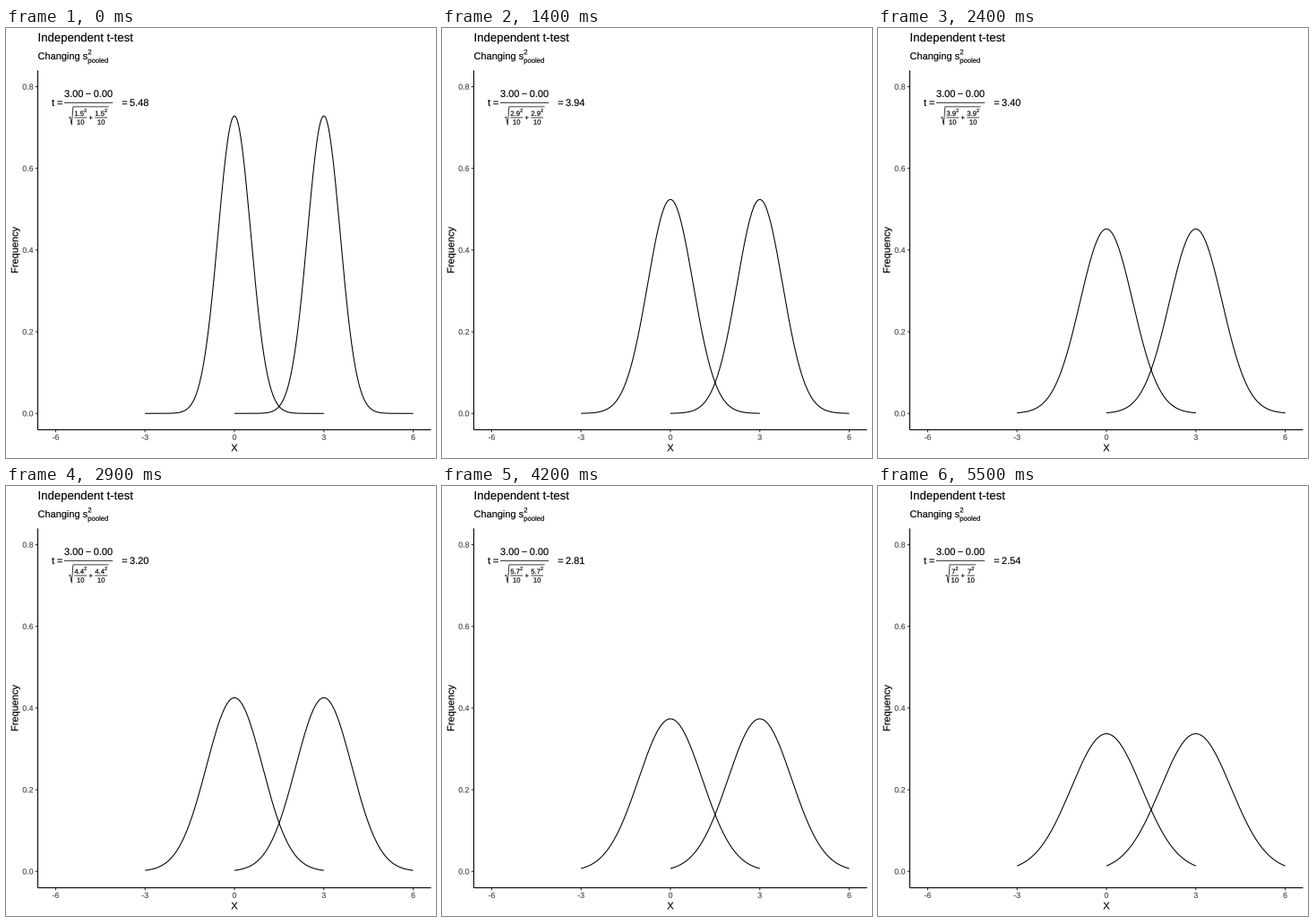
Write a matplotlib script that moves like this. It is 480 px wide and 480 px high and loops after 5.6 s.

```python
import numpy as np
import matplotlib.pyplot as plt
from matplotlib.animation import FuncAnimation
from matplotlib.patches import PathPatch
from matplotlib.path import Path
from matplotlib.textpath import TextPath
from matplotlib.transforms import Affine2D

SIZE, DPI = 480, 100
PX = 72 / DPI                      # one pixel in points
FRAMES, STEP = 56, 100
LEFT, RIGHT, TOP, BOTTOM = 35.5, 474.5, 47.3, 448.5
BODY, SMALL, TINY = 11, 7.7, 5.5   # text, script and nested script sizes
N = 10
MEANS = (0, 3)


def px_x(x):
    return LEFT + (x + 6.6) / 13.2 * (RIGHT - LEFT)


def px_y(y):
    return BOTTOM - (y + 0.04) / 0.88 * (BOTTOM - TOP)


def outline(s, size):
    return TextPath((0, 0), s, size=size, prop={"family": "Liberation Sans"})


def advance(s, size):
    return (outline(s + "|", size).get_extents().x1
            - outline("|", size).get_extents().x1)


def glyphs(s, x, y, size=BODY, align=0, turn=0):
    """Text outline with its baseline at y; align 0 left, 0.5 centre, 1 right."""
    move = Affine2D().translate(-align * advance(s, size), 0)
    move.scale(1, -1).rotate_deg(-turn).translate(x, y)
    return move.transform_path(outline(s, size))


def merge(paths):
    return Path.make_compound_path(*paths)


fig = plt.figure(figsize=(SIZE / DPI, SIZE / DPI), dpi=DPI, facecolor="white")
ax = fig.add_axes([0, 0, 1, 1])
ax.set_xlim(0, SIZE)
ax.set_ylim(SIZE, 0)
ax.axis("off")


def add_text(paths, color="black"):
    patch = PathPatch(merge(paths), fc=color, ec=color, lw=0.12, snap=False)
    return ax.add_patch(patch)


def add_line(xs, ys, width=1.07, color="black", **kw):
    return ax.plot(xs, ys, color=color, lw=width * PX, snap=False,
                   solid_capstyle="butt", **kw)[0]


# Axes
x_ticks = (-6, -3, 0, 3, 6)
y_ticks = (0, 0.2, 0.4, 0.6, 0.8)
for v in x_ticks:
    add_line([px_x(v)] * 2, [BOTTOM, BOTTOM + 2.75], color="#333333")
for v in y_ticks:
    add_line([LEFT - 2.75, LEFT], [px_y(v)] * 2, color="#333333")
add_line([LEFT, LEFT], [TOP, BOTTOM])
add_line([LEFT, RIGHT], [BOTTOM, BOTTOM])

add_text([glyphs(str(v), px_x(v), 459.8, 8.8, 0.5) for v in x_ticks]
         + [glyphs(f"{v:.1f}", 30.5, px_y(v) + 3.1, 8.8, 1) for v in y_ticks],
         "#4d4d4d")

# Titles
add_text([
    glyphs("Independent t-test", LEFT, 15, 13.2),
    glyphs("Changing s", LEFT, 35),
    glyphs("2", 91.3, 29.4, SMALL),
    glyphs("pooled", 91.2, 38.8, SMALL),
    glyphs("X", px_x(0), 472.3, BODY, 0.5),
    glyphs("Frequency", 13.4, (TOP + BOTTOM) / 2, BODY, 0.5, 90),
])

# Fixed part of the formula
add_text([
    glyphs("t", 51.1, 87),
    glyphs("=", 56.9, 87),
    glyphs("3.00", 65, 77),
    glyphs("\u2212", 88.8, 77),
    glyphs("0.00", 97.7, 77),
    glyphs("=", 129.2, 87),
    glyphs("+", 94.7, 102.6, SMALL, 0.5),
])
add_line([65, 119.2], [83.4, 83.4], 0.75)

value = add_text([glyphs("0", 0, 0)])
radical = add_line([], [], 0.75, solid_joinstyle="miter")
bars = [add_line([], [], 0.75) for _ in MEANS]
curves = [add_line([], []) for _ in MEANS]

offset = np.linspace(-3, 3, 201)


def draw(i):
    spread = (15 + i) / 10
    se = np.sqrt(2 * spread / N)
    base = f"{spread:g}"
    base_w = advance(base, SMALL)
    width = max(base_w + advance("2", TINY), advance(str(N), SMALL))

    parts = [glyphs(f"{3 / se:.2f}", 138, 87)]
    reach = 4.6 + width / 2
    for side, bar in zip((-1, 1), bars):
        mid = 94.7 + side * reach
        start = mid - (base_w + advance("2", TINY)) / 2
        parts += [glyphs(base, start, 98, SMALL),
                  glyphs("2", start + base_w, 94, TINY),
                  glyphs(str(N), mid, 107.6, SMALL, 0.5)]
        bar.set_data([mid - width / 2, mid + width / 2], [100, 100])
    value.set_path(merge(parts))

    edge = 94.7 - 4.6 - width
    end = 94.7 + 4.6 + width + 1.5
    radical.set_data([edge - 6.2, edge - 4.7, edge - 3.1, edge - 1.4, end],
                     [100.3, 99.3, 108.3, 87.9, 87.9])

    density = np.exp(-(offset / se) ** 2 / 2) / (se * np.sqrt(2 * np.pi))
    for mean, curve in zip(MEANS, curves):
        curve.set_data(px_x(mean + offset), px_y(density))
    return [value, radical, *bars, *curves]


anim = FuncAnimation(fig, draw, frames=FRAMES, interval=STEP,
                     init_func=lambda: draw(0), repeat=True, repeat_delay=0)
plt.show()
```
